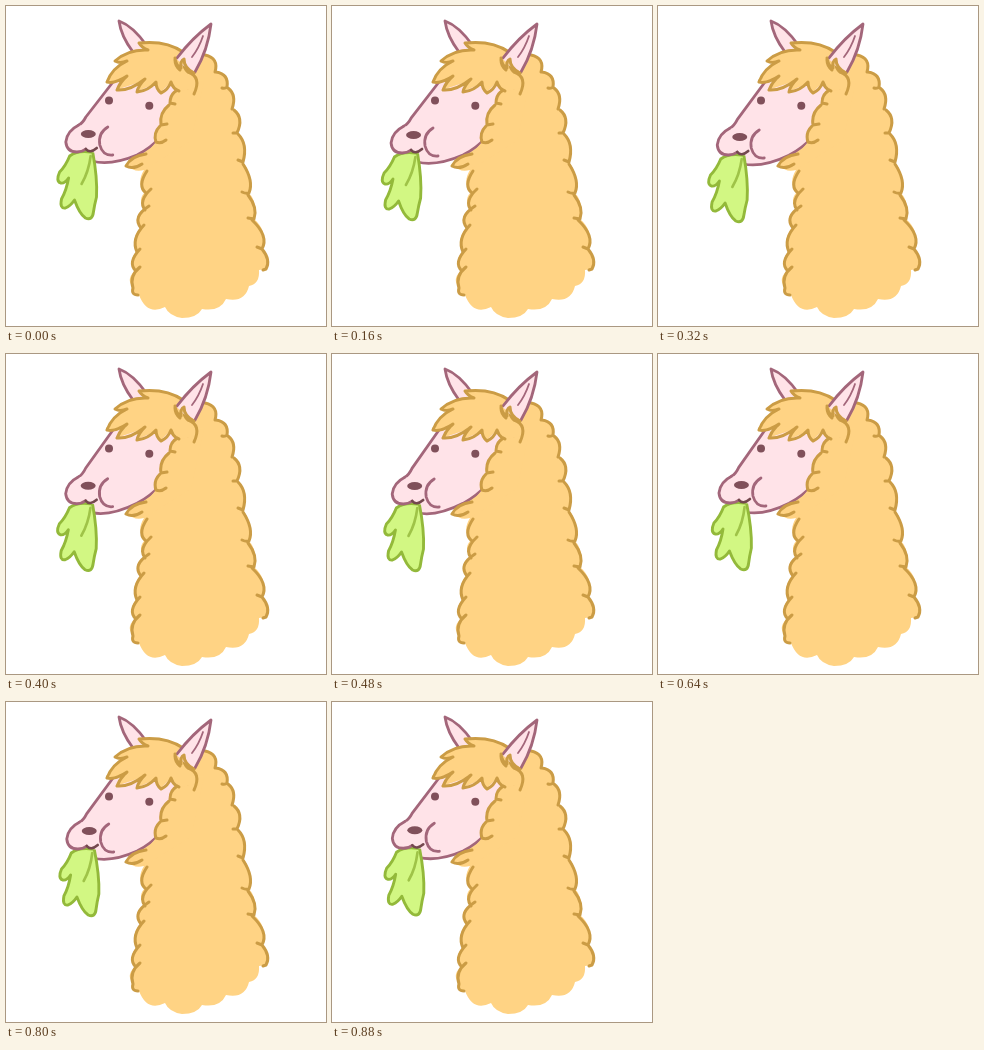
These frames come from a looping animation (320 by 320 pixels, 0.96 s). An HTML page:

```html
<!DOCTYPE html>
<html lang="en">
<head>
<meta charset="utf-8">
<title>Chewing llama</title>
<style>
  html, body { margin: 0; width: 100%; height: 100%; overflow: hidden; background: #fff; }
  svg { display: block; width: 100vw; height: 100vh; }
  path { stroke-linecap: round; stroke-linejoin: round; fill: none; }
  .wool { fill: #ffd384; }
  .woolLine { stroke: #cb9c45; stroke-width: 3; }
  .skin { fill: #ffe3e8; }
  .skinLine { stroke: #a3667a; stroke-width: 2.8; }
  .thin { stroke: #a3667a; stroke-width: 1.8; }
  .dark { fill: #80505a; }
  .lip { stroke: #74484e; stroke-width: 2.6; }
  .leaf { fill: #d2f783; stroke: #93b93a; stroke-width: 2.9; }
  .vein { stroke: #9fc348; stroke-width: 2.6; }
</style>
</head>
<body>
<svg viewBox="0 0 320 320">
  <!-- far ear -->
  <path class="skin skinLine" d="M127 46Q115 30 113 15Q127 20 141 40"/>

  <!-- neck -->
  <path class="wool" d="M150 60L198 49Q213 52 209 66Q223 67 221 82Q230 88 227 103Q237 110 232 127Q241 137 237 156Q246 167 243 187Q252 197 248 213Q262 225 256 242Q265 254 260 263L253 264Q254 278 243 280Q239 297 220 293Q214 306 196 303Q191 312 176 312Q163 310 159 301Q141 310 133 289Q124 290 126 280Q120 272 130 264Q122 255 130 246Q125 232 134 222Q126 209 139 203Q131 194 139 186Q130 177 138 164Q128 167 121 159L133 145L150 130Z"/>
  <path class="woolLine" d="M199 49Q213 52 209 66M210 66Q223 68 221 81Q219 83 216 82M222 82Q231 89 226 103M228 104Q238 112 231 127L227 127M232 128Q242 138 237 156L232 154M237 158Q248 175 243 187Q240 188 236 186M242 189Q252 202 248 213L242 212M246 214Q263 230 256 243L251 241M256 243Q265 254 260 263L257 264"/>
  <path class="woolLine" d="M132 289Q125 289 127 282Q123 270 134 261M130 265Q121 257 134 243M131 246Q125 233 138 219M135 222Q126 211 143 200M139 204Q132 195 145 183M140 187Q131 180 141 165"/>

  <!-- head -->
  <path class="skin" id="face"/>
  <path class="skinLine" id="jaw"/>
  <circle class="dark" cx="103" cy="94.500" r="4"/>
  <circle class="dark" cx="143.300" cy="99.800" r="4"/>
  <path class="wool" d="M156 74L174 82Q165 86 164 97Q154 105 155 119Q148 125 150 136L140 148Q126 150 120 160Q130 167 145 160L185 135L198 75Z"/>
  <path class="woolLine" d="M181 82Q164 83 164 97L169 98M163 99Q153 107 155 119L161 118M154 120Q147 127 150 136Q155 138 160 134M140 148Q125 150 120 160Q127 164 136 158"/>
  <path class="wool" d="M133 36Q158 34 177 47L194 60L190 82L172 86L163 78L154 87L148 78L130 86L134 76L110 84L116 74L101 76Q106 62 116 57L109 55Q120 45 138 44Z"/>
  <path class="woolLine" d="M177 46Q160 34 133 37Q136 42 142 44Q122 43 109 55Q114 58 121 55Q106 62 101 76Q109 78 121 70Q114 76 111 84Q124 85 139 73Q132 80 131 86Q142 85 150 76Q150 83 155 87Q162 84 165 76Q167 83 173 85M169 54Q169 60 174 64M178 54Q177 62 182 66Q196 71 188 88"/>

  <!-- near ear -->
  <path class="skin" d="M170 53Q186 33 205 18Q202 44 189 66L178 60Z"/>
  <path class="skinLine" d="M171 52Q186 32 205 18Q202 44 189 66"/>
  <path class="thin" d="M197 30Q193 42 186 51"/>
  <path class="wool woolLine" d="M169 52Q170 60 175 62Q174 55 178 53Q178 62 188 67"/>

  <!-- muzzle -->
  <path class="leaf" id="leaf"/>
  <path class="vein" id="vein"/>
  <path class="skin" id="muzzle"/>
  <path class="skinLine" id="lips"/>
  <path class="lip" id="mouth"/>
  <ellipse class="dark" id="nose" rx="7.500" ry="4"/>
</svg>
<script>
  const STEP = 80, COUNT = 12;
  const get = id => document.getElementById(id);

  // Moves every x y pair of a path with the given function.
  const warp = (d, move) => d.replace(/([\d.]+) ([\d.]+)/g, (_, x, y) =>
    move(+x, +y).map(v => v.toFixed(2)).join(' '));
  const set = (id, d, move) => get(id).setAttribute('d', warp(d, move));

  function draw(step) {
    const a = step / COUNT * 2 * Math.PI;
    const drop = 2 * (1 - Math.cos(a));
    const sway = -Math.sin(a + 0.2);

    const chew = (x, y) => [x + sway, y + drop];
    // The head follows the muzzle less and less towards the eyes and neck.
    const skin = (x, y) => {
      const k = Math.max(0, Math.min(1, (135 - x) / 45, (y - 76) / 44));
      return [x + sway * k, y + drop * k];
    };
    // The leaf hangs from the mouth and swings further at its tips.
    const hang = (x, y) => [x + sway * (1.6 + (y - 146) / 50), y + drop];

    set('face', 'M107 76L80 111Q77 117 72 120L80 154Q103 160 131 150Q145 143 157 126L170 78Z', skin);
    set('jaw', 'M107 76L80 111Q77 117 72 120M86 155Q105 160 131 149Q146 141 153 132', skin);
    set('leaf', 'M85 146Q72 144 64 150Q60 160 54 166Q50 175 55 177Q59 178 63 172Q61 184 56 193Q54 203 60 202Q65 200 69 194Q74 208 80 212Q87 215 88 206Q89 199 91 191Q92 172 87 146Z', hang);
    set('vein', 'M85 150Q83 166 76 178', hang);
    set('muzzle', 'M73 119Q61 125 60 136Q62 147 74 145L80 143L86 146L98 148L98 124Z', chew);
    set('lips', 'M73 119Q61 125 60 136Q61 146 71 146Q76 146 80 143M102 121Q92 127 94 139Q97 150 107 149', chew);
    set('mouth', 'M80 143Q84 148 91 142', chew);

    const [x, y] = chew(82.5, 128);
    get('nose').setAttribute('cx', x);
    get('nose').setAttribute('cy', y);
  }

  let last = -1;
  function frame(now) {
    const step = Math.floor(now / STEP) % COUNT;
    if (step !== last) draw(last = step);
    requestAnimationFrame(frame);
  }
  draw(0);
  requestAnimationFrame(frame);
</script>
</body>
</html>
```
